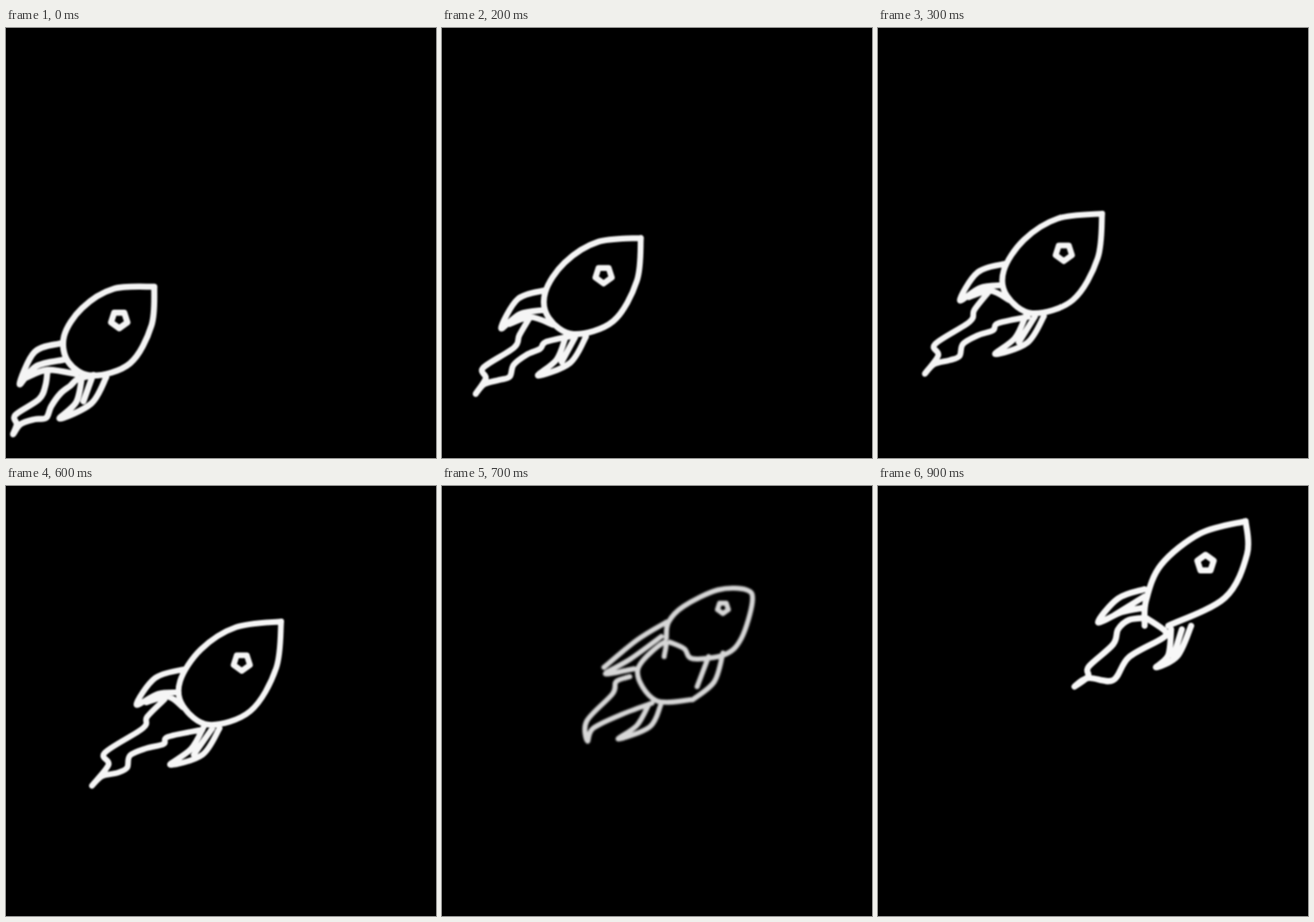
Recreate the animation shown at these times as an HTML page. Size 600 by 600 pixels, loop 1000 ms.

```html
<!DOCTYPE html>
<html lang="en">
<head>
<meta charset="utf-8">
<title>Rocket</title>
<style>
html, body { margin: 0; width: 100%; height: 100%; overflow: hidden; background: #000; }
svg { display: block; width: 100%; height: 100%; }
path { fill: none; stroke-linecap: round; stroke-linejoin: round; }
</style>
</head>
<body>
<svg viewBox="0 0 600 600">
  <defs>
    <filter id="soft" filterUnits="userSpaceOnUse" x="0" y="0" width="600" height="600">
      <feGaussianBlur id="blur" stdDeviation="1"/>
    </filter>
  </defs>
  <path id="ink" filter="url(#soft)"/>
</svg>
<script>
const LOOP = 1000, STEP = 100;
const blur = document.getElementById('blur');
const ink = document.getElementById('ink');

// Key points of each stroke; a smooth curve joins them.
const stroke = s => s.split(' ').map(p => p.split(',').map(Number));

const launch = {
  port: [158, 407], size: 12, turn: 90, width: 8.5, gray: 244, soft: 1,
  strokes: [
    '207,361 150,364 106,391 81,430 87,466 120,485 173,468 203,415 207,361',
    '76,440 40,452 19,497 42,472 80,463',
    '28,488 58,477 98,483',
    '106,487 98,522 75,545 119,524 140,487',
    '120,488 108,521',
    '58,477 55,499 46,518 13,540 15,553 10,567 20,553 40,546 56,544 63,528 76,510 90,499 100,490 122,484'
  ].map(stroke)
};
const cruise = {
  port: [293, 282], size: 12, turn: 90, width: 8, gray: 246, soft: 1,
  strokes: [
    '348,225 285,233 236,264 207,308 211,343 247,369 305,350 341,290 348,225',
    '211,292 172,304 146,341 176,326 205,324',
    '160,338 190,330 211,345',
    '240,372 222,403 193,425 238,411 262,374',
    '252,374 226,411',
    '185,334 161,358 155,374 102,408 107,425 84,454 98,441 120,436 133,429 137,412 160,402 184,396 190,386 238,376'
  ].map(stroke)
};
const split = {
  port: [392, 170], size: 8, turn: 90, width: 7, gray: 215, soft: 1.8,
  strokes: [
    '313,212 316,190 337,168 385,145 425,145 433,162 418,212 395,235 350,241 338,227 318,218',
    '313,190 272,215 226,253',
    '306,210 262,242 228,262 268,255',
    '350,298 298,299 273,257 310,218 310,238',
    '392,233 380,273 350,298',
    '372,238 356,280',
    '262,266 243,273 238,290 202,328 203,356 211,338 250,319 293,303',
    '305,306 290,336 246,353 272,334 288,306'
  ].map(stroke)
};
const soar = {
  port: [457, 108], size: 12, turn: -90, width: 8.5, gray: 248, soft: 1,
  strokes: [
    '513,49 450,66 395,110 374,160 372,195',
    '513,49 515,95 484,156 405,195',
    '372,144 335,157 307,190 340,176 370,170',
    '330,180 372,154',
    '409,200 405,236 388,253 418,237 437,195',
    '424,200 412,238',
    '374,184 350,187 335,200 328,221 294,252 293,266 274,280 293,268 328,271 350,239 396,213 401,203 374,184'
  ].map(stroke)
};

const mix = (a, b, k) =>
  Array.isArray(a) ? a.map((v, i) => mix(v, b[i], k)) : a + (b - a) * k;

const blend = (a, b, k) =>
  Object.fromEntries(Object.keys(a).map(key => [key, mix(a[key], b[key], k)]));

const shift = (pose, d) => ({
  ...pose,
  port: [pose.port[0] + d, pose.port[1] - d],
  strokes: pose.strokes.map(s => s.map(([x, y]) => [x + d, y - d]))
});

// The drawing changes in hard steps, pausing once before mid-loop.
function poseAt(t) {
  const step = Math.floor(t / STEP);
  if (step < 5) return blend(launch, cruise, Math.min(step, 3) / 4);
  if (step < 7) return shift(cruise, (step - 5) * 36);
  if (step < 8) return split;
  return shift(soar, (Math.min(step, 9) - 9) * 38);
}

function curve(pts) {
  const at = i => pts[Math.max(0, Math.min(pts.length - 1, i))];
  let d = 'M' + pts[0];
  for (let i = 1; i < pts.length; i++) {
    const [a, b, c, e] = [at(i - 2), at(i - 1), at(i), at(i + 1)];
    const out = b.map((v, k) => v + (c[k] - a[k]) / 6);
    const into = c.map((v, k) => v - (e[k] - b[k]) / 6);
    d += 'C' + [out, into, c].join(' ');
  }
  return d;
}

function porthole({ port: [x, y], size, turn }) {
  const corner = (_, i) => {
    const a = (turn + i * 72) * Math.PI / 180;
    return [x + size * Math.cos(a), y + size * Math.sin(a)];
  };
  return 'M' + Array.from({ length: 5 }, corner).join('L') + 'Z';
}

function draw(t) {
  const pose = poseAt(t);
  const { gray } = pose;
  ink.setAttribute('d', pose.strokes.map(curve).join('') + porthole(pose));
  ink.setAttribute('stroke', `rgb(${gray},${gray},${gray})`);
  ink.setAttribute('stroke-width', pose.width);
  blur.setAttribute('stdDeviation', pose.soft);
}

const begin = performance.now();
function tick() {
  draw((performance.now() - begin) % LOOP);
  requestAnimationFrame(tick);
}
tick();
</script>
</body>
</html>
```
